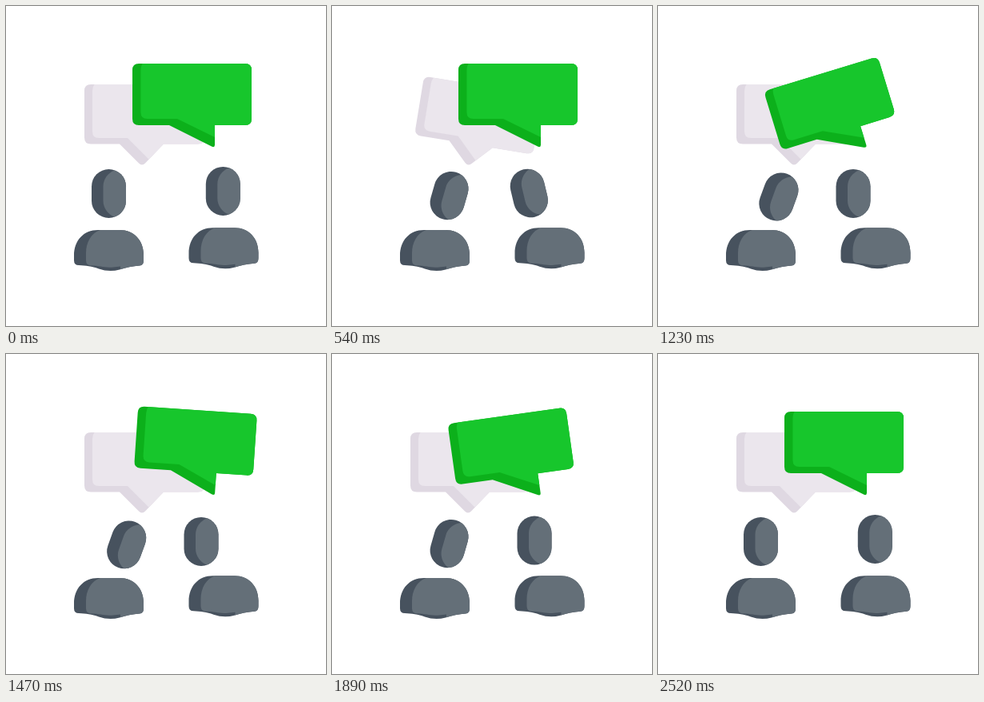
Animation of 400x400 px, one loop 4550 ms. Source, as an HTML page with a canvas:

```html
<!DOCTYPE html>
<html lang="en">
<head>
<meta charset="utf-8">
<title>Two people talking</title>
<style>
html, body { margin: 0; width: 100%; height: 100%; overflow: hidden; background: #fff; }
canvas { display: block; width: 100%; height: 100%; }
</style>
</head>
<body>
<canvas id="stage"></canvas>
<script>
const SIZE = 400, LOOP = 4550, STEP = 30, LAST = 2520;
const canvas = document.getElementById('stage');
const ctx = canvas.getContext('2d');
const dpr = window.devicePixelRatio || 1;
canvas.width = canvas.height = SIZE * dpr;

const GREEN = ['#0cb01b', '#17c62c'];
const PALE = ['#dfd8e2', '#ebe6ed'];
const SLATE = ['#47525e', '#646f78'];

// Each shape: a dark outline and a lighter face clipped to it.
const shape = (outline, face) => ({ outline: new Path2D(outline), face: new Path2D(face) });

// Bubbles are placed relative to the stage, heads to their centre.
const paleBubble = shape(
  'M106 98H240Q248 98 248 106V165Q248 172.5 240 172.5H197L174 196.5Q170 200.5 166 196.5L142 172.5H106Q98 172.5 98 164.5V106Q98 98 106 98Z',
  'M113 96Q108 99 108 106V157Q108 165 116 165H152L180 193L260 193V96Z');
const greenBubble = shape(
  'M166 72H299Q307 72 307 80V141Q307 149 299 149H261V173.5Q261 177.5 257 175.5L204 149H166Q158 149 158 141V80Q158 72 166 72Z',
  'M172 70Q168.5 74 168.5 80V133Q168.5 141 176.5 141H214L263 165L310 165V70Z');
const head = shape(
  'M-21.5 -9A21.5 21.5 0 0 1 21.5 -9V9A21.5 21.5 0 0 1 -21.5 9Z',
  'M7 -29C-1 -26 -7 -18 -7 -9V9C-7 18 -1 26 7 29H24V-29Z');
const torso = shape(
  'M85 318V312C85 293 97 280 115 280H142C160 280 172 293 172 311V318Q172 324 167 324.5C158 325 150 327 142 329.5Q129 333 116 328.5C107 325 100 324.5 91 324Q85 324 85 318Z',
  'M122 279C108 281 100 294 100 309V318Q100 324.5 107 324.5C118 324.5 122 327.5 134 326.5L143 325.5V332H176V279Z');

function draw({ outline, face }, [dark, light]) {
  ctx.fillStyle = dark;
  ctx.fill(outline);
  ctx.save();
  ctx.clip(outline);
  ctx.fillStyle = light;
  ctx.fill(face);
  ctx.restore();
}

function within(fn) {
  ctx.save();
  fn();
  ctx.restore();
}

const rad = deg => deg * Math.PI / 180;
const smooth = x => x * x * (3 - 2 * x);

// cubic-bezier(.25, .1, .25, 1)
function ease(x) {
  let lo = 0, hi = 1, s = x;
  const bez = (a, b, u) => 3 * a * u * (1 - u) ** 2 + 3 * b * u * u * (1 - u) + u ** 3;
  for (let i = 0; i < 18; i++) {
    s = (lo + hi) / 2;
    if (bez(.25, .25, s) < x) lo = s; else hi = s;
  }
  return bez(.1, 1, s);
}

function track(t, keys, curve = smooth) {
  if (t <= keys[0][0]) return keys[0][1];
  for (let i = 1; i < keys.length; i++) {
    const [t0, a] = keys[i - 1], [t1, b] = keys[i];
    if (t < t1) return a + (b - a) * curve((t - t0) / (t1 - t0));
  }
  return keys[keys.length - 1][1];
}

// Damped swing of a bubble around the tip of its tail.
const LEG = 255;
const SWING = [0, -22, 15, -8.5, 3.1, 0].map((deg, i) => [i * LEG, deg]);

const LEFT_TILT = [[0, 0], [240, 16], [600, 16], [810, 17], [1140, 20], [1230, 20],
  [1350, 22.5], [1620, 16], [2130, 16], [2490, 0]];
const RIGHT_X = [[0, 0], [480, -25], [840, -25], [1080, -27.3], [1740, -27.3], [2130, 0]];
const RIGHT_Y = [[0, 0], [300, 2.5], [1080, 3], [1740, 3], [2070, 0]];
const RIGHT_TILT = [[0, 0], [300, -12], [780, -15], [840, -15], [1170, 0]];

function bubble(art, colours, x, y, t) {
  within(() => {
    ctx.translate(x, y);
    ctx.rotate(rad(track(t, SWING, ease)));
    ctx.translate(-x, -y);
    draw(art, colours);
  });
}

function body(dx, dy, sx, sy) {
  within(() => {
    ctx.translate(128.5 + dx, 331 + dy);
    ctx.scale(sx, sy);
    ctx.translate(-128.5, -331);
    draw(torso, SLATE);
  });
}

function render(t) {
  ctx.setTransform(dpr, 0, 0, dpr, 0, 0);
  ctx.fillStyle = '#fff';
  ctx.fillRect(0, 0, SIZE, SIZE);

  bubble(paleBubble, PALE, 170, 198, t > 0 ? t + 15 : 0);
  bubble(greenBubble, GREEN, 261, 176, t - 1110);

  const bob = t < 540 ? Math.sin(Math.PI * t / 540) : 0;
  body(0, 0, 1 - .022 * bob, 1 + .02 * bob);
  body(143.5, -2.7, 1 + .025 * bob, 1 - .035 * bob);

  within(() => {
    ctx.translate(128.5, 300 - 2.5 * bob);
    ctx.rotate(rad(track(t, LEFT_TILT)));
    ctx.translate(0, -65.5);
    draw(head, SLATE);
  });
  within(() => {
    ctx.translate(271.3 + track(t, RIGHT_X), 231.4 + track(t, RIGHT_Y) + 1.7 * bob);
    ctx.rotate(rad(track(t, RIGHT_TILT)));
    draw(head, SLATE);
  });
}

const start = performance.now();
function tick() {
  const t = (performance.now() - start) % LOOP;
  render(Math.min(LAST, Math.floor(t / STEP) * STEP));
  requestAnimationFrame(tick);
}
tick();
</script>
</body>
</html>
```
